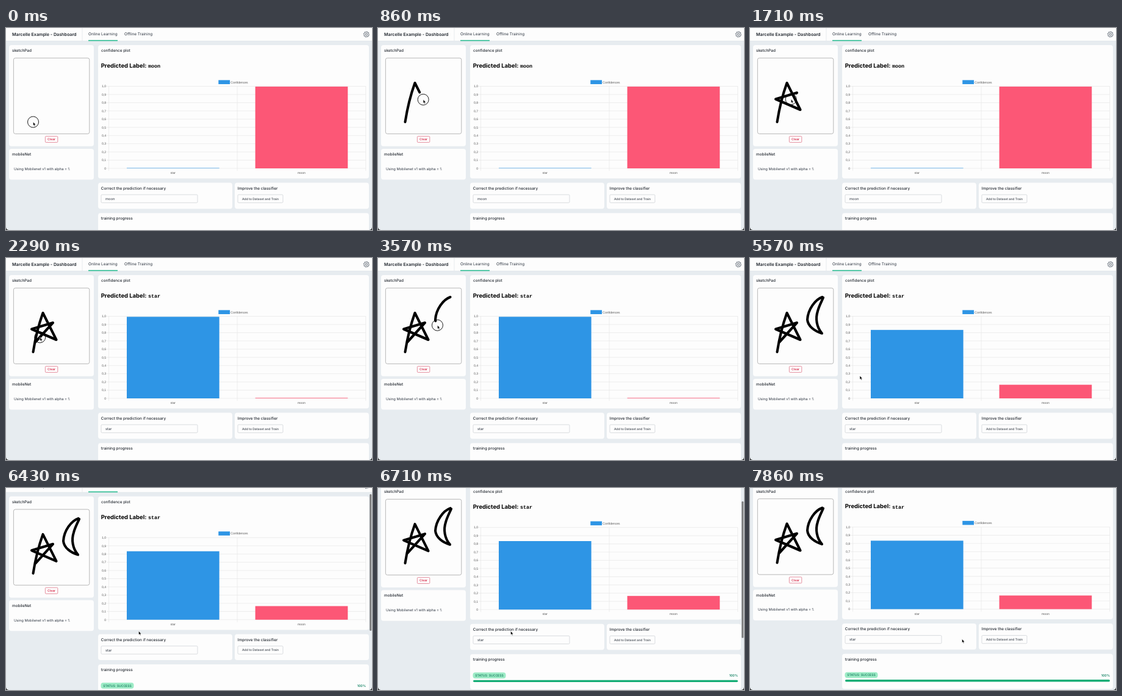
These frames come from a looping animation (600x331 px, 8000 ms). An HTML page:

```html
<!DOCTYPE html>
<html lang="en">
<head>
<meta charset="utf-8">
<title>Dashboard</title>
<style>
  html, body { margin: 0; width: 100%; height: 100%; overflow: hidden; background: #e7ecf0; }
  svg { display: block; width: 100%; height: 100%; }
  text { font: 400 5.8px Inter, sans-serif; fill: #2d3540; text-rendering: geometricPrecision; }
  .brand { font-size: 7.15px; font-weight: 600; fill: #20262e; }
  .tab { font-size: 6.4px; }
  .title { font-size: 6.4px; font-weight: 550; fill: #20262e; }
  .heading { font-size: 9.45px; font-weight: 700; fill: #000; }
  .code { font: 700 8.4px "Liberation Mono", monospace; fill: #000; }
  .chart { font: 400 5.1px "Liberation Sans", sans-serif; fill: #555; }
  .button { font-size: 5.05px; font-weight: 600; fill: #555b63; }
  .badge { font-size: 5.05px; font-weight: 500; fill: #067052; }
  .percent { font-size: 5.2px; font-weight: 600; fill: #128263; }
  .end { text-anchor: end; }
  .mid { text-anchor: middle; }
  .card { fill: #fdfdfd; }
  .grid { stroke: #e3e3e3; stroke-width: .6; }
  .field { fill: #fdfdfd; stroke: #c9cdd2; stroke-width: .7; }
  .ink { fill: none; stroke: #000; stroke-width: 4.1; stroke-linecap: round; stroke-linejoin: round; }
  .glide { fill: none; }
</style>
</head>
<body>
<svg viewBox="0 0 600 331" preserveAspectRatio="none">
  <g id="page">
    <rect class="card" width="600" height="21.3"/>
    <path d="M0 21.4H600M125 0V21" stroke="#dde2e7" stroke-width=".7"/>
    <text class="brand" x="10" y="12.8">Marcelle Example - Dashboard</text>
    <text class="tab" x="135" y="12.4">Online Learning</text>
    <text class="tab" x="194" y="12.4">Offline Training</text>
    <rect x="135" y="19.8" width="48" height="1.5" fill="#1fb98c"/>
    <g transform="translate(590.8 10.4)" fill="none" stroke="#4b5563" stroke-width=".9" stroke-linejoin="round">
      <path id="gear"/>
      <circle r="1.7"/>
    </g>

    <rect class="card" x="5" y="28" width="139" height="165.8" rx="4"/>
    <text class="title" x="10" y="39">sketchPad</text>
    <rect x="12.4" y="49.2" width="124.4" height="124.2" rx="3" fill="#fdfdfd" stroke="#a6a6a6" stroke-width=".8"/>
    <rect x="64.4" y="177.4" width="20.4" height="10" rx="1.2" fill="#fdfdfd" stroke="#e0758a" stroke-width=".8"/>
    <text class="button mid" x="74.6" y="184.2" style="fill:#d9304f">Clear</text>

    <rect class="card" x="5" y="198" width="139" height="50.5" rx="4"/>
    <text class="title" x="10" y="209">mobileNet</text>
    <text x="13" y="232.9">Using Mobilenet v1 with alpha = 1.</text>

    <rect class="card" x="151" y="28" width="444" height="218.6" rx="4"/>
    <text class="title" x="156" y="39">confidence plot</text>
    <text class="heading" x="155.7" y="64.8">Predicted Label:</text>
    <text class="code label" x="233" y="65"></text>
    <rect x="348.3" y="85.4" width="18.8" height="6.6" fill="#2e95e5"/>
    <text class="chart" x="368.3" y="90.6">Confidences</text>
    <g id="chart"></g>

    <rect class="card" x="151" y="253.6" width="220" height="42.6" rx="4"/>
    <text class="title" x="155.8" y="264.8">Correct the prediction if necessary</text>
    <rect class="field" x="156" y="273.1" width="158" height="13.2" rx="1.5"/>
    <text class="label" x="163" y="281.7"></text>

    <rect class="card" x="375" y="253.6" width="220" height="42.6" rx="4"/>
    <text class="title" x="379.8" y="264.8">Improve the classifier</text>
    <rect class="field" x="380" y="273.1" width="74" height="13.2" rx="1.5"/>
    <text class="button mid" x="417" y="281.6">Add to Dataset and Train</text>

    <rect class="card" x="151" y="303.2" width="444" height="57.6" rx="4"/>
    <text class="title" x="155.8" y="314.3">training progress</text>
    <rect x="155.5" y="333.2" width="54" height="9.6" rx="4" fill="#9debc6"/>
    <text class="badge mid" x="182.5" y="339.9">STATUS: SUCCESS</text>
    <text class="percent end" x="590" y="340">100%</text>
    <rect x="156" y="345.5" width="434" height="3.4" rx="1.7" fill="#16ad76"/>

    <path class="ink" data-start="130" data-end="1930" d="M44.5 154Q50 119 60.5 90L82.5 134L42 116.5L77 106L48 138"/>
    <path class="ink" data-start="2850" data-end="4690" d="M118.5 64C107 68 95 84 94 101C95 112 106 120 118 123.5C109 113 107 99 111 87C113 79 117 72 120 65"/>
  </g>
  <path class="glide" data-start="2140" data-end="2850" d="M48 138L118.5 64"/>
  <path class="glide" data-start="4690" data-end="5000" d="M120 65L129 72"/>
  <path class="glide" data-start="5150" data-end="5571" d="M129 72L180 193"/>
  <path class="glide" data-start="5720" data-end="6150" d="M180 193L217.5 234.5"/>
  <path class="glide" data-start="7290" data-end="7857" d="M217.5 234.5L347.5 247.5"/>

  <rect id="scrollbar" x="596.2" width="3" height="224" rx="1.5" fill="#7d7d7d"/>
  <path d="M0 327.5V331H3.5Q0 331 0 327.5ZM600 327.5V331H596.5Q600 331 600 327.5Z" fill="#111" stroke="#111" stroke-width=".5"/>
  <g id="cursor">
    <circle id="brush" r="9" fill="none" stroke="#000" stroke-width=".9"/>
    <path d="M0 0V6L1.4 4.8L2.4 7L3.5 6.5L2.5 4.4H4.3Z" fill="#000" stroke="#fff" stroke-width=".5"/>
  </g>
</svg>
<script>
const LOOP = 8000, FRAME = 1000 / 7, INK_LAG = 100, CHART_TIME = 400, SCROLL = 31.5;
const LEFT = 168.5, RIGHT = 589.8, BASE = 230, HEIGHT = 134.5, SLOT = (RIGHT - LEFT) / 2;
const $ = id => document.getElementById(id);
const all = selector => [...document.querySelectorAll(selector)];

const progress = (t, start, end) => Math.min(1, Math.max(0, (t - start) / (end - start)));
const smooth = u => u * u * (3 - 2 * u);
const mix = (a, b, u) => a + (b - a) * u;

function add(tag, attrs, text = '') {
  const node = document.createElementNS('http://www.w3.org/2000/svg', tag);
  for (const key in attrs) node.setAttribute(key, attrs[key]);
  node.textContent = text;
  $('chart').append(node);
  return node;
}

for (let i = 0; i <= 10; i++) {
  const y = BASE - HEIGHT * i / 10;
  add('path', { class: 'grid', d: `M164.5 ${y}H${RIGHT}` });
  add('text', { class: 'chart end', x: 164, y: y + 1.8 }, i ? (i / 10).toFixed(1).replace('.', ',') : '0');
}
for (let i = 0; i <= 2; i++) add('path', { class: 'grid', d: `M${LEFT + SLOT * i} ${BASE - HEIGHT}v${HEIGHT + 4}` });

function addBar(name, slot, fill) {
  const x = LEFT + SLOT * slot;
  add('text', { class: 'chart mid', x: x + SLOT / 2, y: 239.3 }, name);
  return add('rect', { x: x + SLOT * .14, width: SLOT * .72, fill });
}
const starBar = addBar('star', 0, '#2e95e5'), moonBar = addBar('moon', 1, '#fc5776');

const teeth = Array.from({ length: 32 }, (_, i) => {
  const angle = (i + .5) * Math.PI / 16, r = i % 4 < 2 ? 4.6 : 3.6;
  return `${r * Math.cos(angle)} ${r * Math.sin(angle)}`;
});
$('gear').setAttribute('d', `M${teeth.join('L')}Z`);

// Ink strokes and glides together make up the cursor's route.
const legs = all('.ink, .glide').map(path => ({
  path,
  ink: path.classList.contains('ink'),
  start: +path.dataset.start,
  end: +path.dataset.end,
  length: path.getTotalLength(),
})).sort((a, b) => a.start - b.start);
const strokes = legs.filter(leg => leg.ink);

// Confidence in "star" before any stroke and after each one.
const scores = [.004, .994, .834];

function setBar(bar, value) {
  const height = Math.max(.6, HEIGHT * value);
  bar.setAttribute('y', BASE - height);
  bar.setAttribute('height', height);
}

function drawChart(t) {
  const done = strokes.filter(stroke => stroke.end <= t).length;
  let score = scores[0];
  strokes.forEach(({ end }, i) => {
    score = mix(score, scores[i + 1], 1 - (1 - progress(t, end, end + CHART_TIME)) ** 4);
  });
  setBar(starBar, score);
  setBar(moonBar, 1 - score);
  all('.label').forEach(node => node.textContent = scores[done] > .5 ? 'star' : 'moon');
}

function drawInk(t) {
  for (const { path, start, end, length } of strokes) {
    const u = progress(t - INK_LAG, start, end);
    path.style.visibility = u > 0 ? 'visible' : 'hidden';
    path.setAttribute('stroke-dasharray', u < 1 ? `${u * length} ${2 * length}` : 'none');
  }
}

function drawCursor(t) {
  const leg = legs.findLast(({ start }) => start <= t) ?? legs[0];
  const u = progress(t, leg.start, leg.end);
  const { x, y } = leg.path.getPointAtLength((leg.ink ? u : smooth(u)) * leg.length);
  $('cursor').setAttribute('transform', `translate(${x} ${y})`);
  $('brush').style.visibility = x < 137 && y < 173 ? 'visible' : 'hidden';
}

function drawScroll(t) {
  const scroll = SCROLL * smooth(progress(t, 6130, 6770));
  $('page').setAttribute('transform', `translate(0 ${-scroll})`);
  $('scrollbar').setAttribute('y', scroll * .705);
  $('scrollbar').setAttribute('opacity', progress(t, 6140, 6280) - progress(t, 7290, 7560));
}

// The picture advances seven times a second.
function tick() {
  const t = Math.floor((performance.now() % LOOP + 5) / FRAME) * FRAME % LOOP;
  drawInk(t);
  drawChart(t);
  drawCursor(t);
  drawScroll(t);
  requestAnimationFrame(tick);
}
tick();
</script>
</body>
</html>
```
